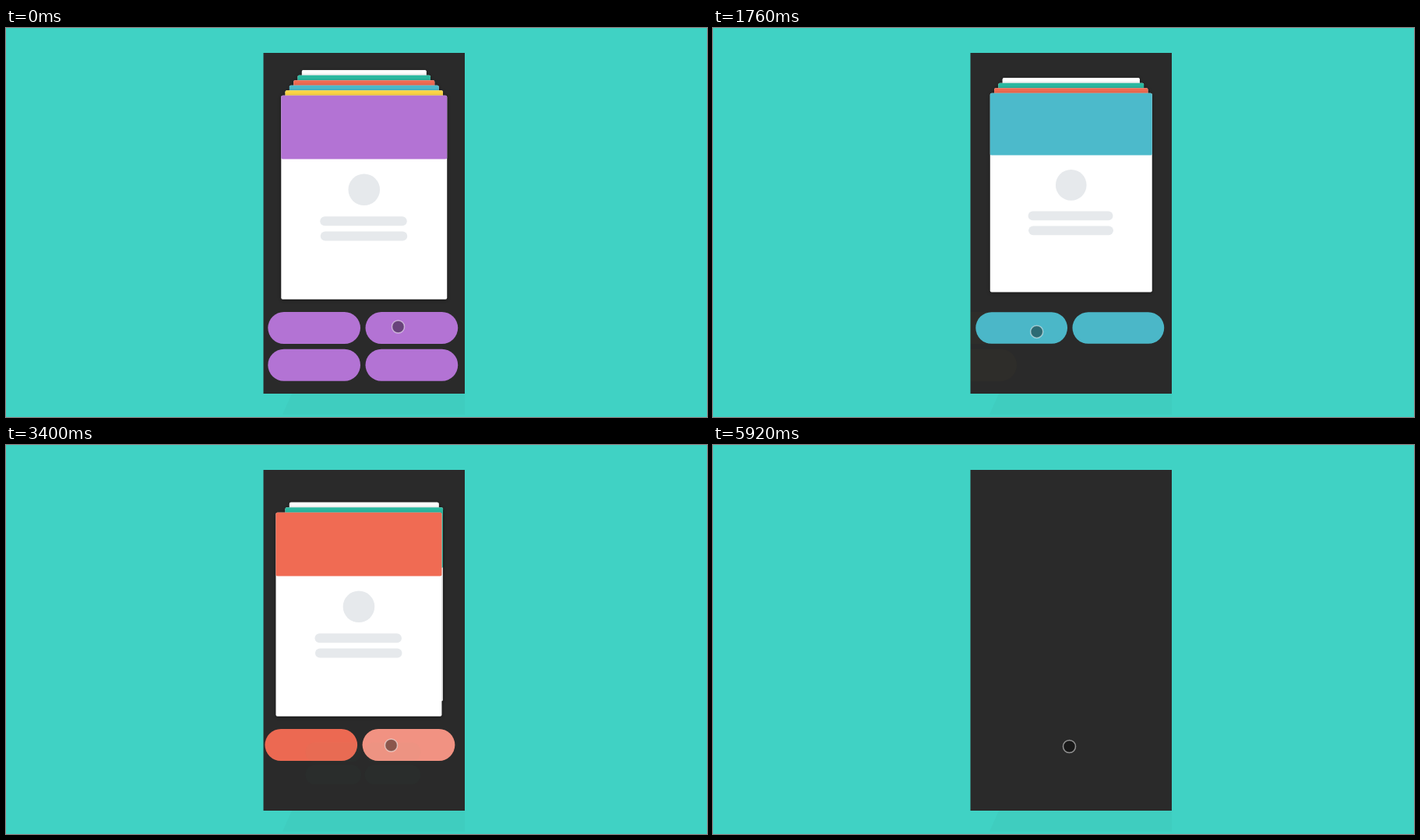
These frames come from a looping animation (900 by 500 pixels, 5960 ms). An HTML page with a canvas:

```html
<!DOCTYPE html>
<html lang="en">
<head>
<meta charset="utf-8">
<title>Card stack</title>
<style>
  html, body { margin: 0; width: 100%; height: 100%; overflow: hidden; background: #40d2c4; }
  canvas { display: block; }
</style>
</head>
<body>
<canvas id="stage" width="900" height="500"></canvas>
<script>
const ctx = document.getElementById('stage').getContext('2d');
const LOOP = 5960, STEP = 40;
const EXIT = 400, ADVANCE = 700;

// leave: when the card starts to slide away; pressed: index of the tapped button
const cards = [
  { header: '#b373d4', button: '#b373d4', count: 4, leave: 370, pressed: 1 },
  { header: '#fcd446', button: '#fcd446', count: 4, leave: 1400, pressed: 0 },
  { header: '#4cbacb', button: '#4cbacb', count: 2, leave: 2310, pressed: 0 },
  { header: '#f06b53', button: '#f06b53', count: 2, leave: 3360, pressed: 1 },
  { header: '#2cb9a1', button: '#2cb9a1', count: 4, leave: 4230, pressed: 0 },
  { header: '#fff', button: '#1c80d5', count: 1, leave: 5040, pressed: 0 },
];

// time, x, y
const pointer = [
  [0, 503.5, 384], [450, 503.5, 384], [1250, 416.5, 394], [1400, 416, 392],
  [2300, 415, 387], [2500, 415, 387], [3300, 494.5, 386], [3460, 494.5, 386],
  [4130, 406.5, 387], [4300, 407, 387], [4900, 456.5, 387.5], [LOOP, 457.5, 387.5],
];

const clamp = v => Math.max(0, Math.min(1, v));
const mix = (a, b, u) => a + (b - a) * u;
const easeQuad = u => u < 0.5 ? 2 * u * u : 1 - 2 * (1 - u) ** 2;
const progress = (t, start, length) => easeQuad(clamp((t - start) / length));

function box(x, y, w, h, r, fill) {
  ctx.fillStyle = fill;
  ctx.beginPath();
  ctx.roundRect(x, y, w, h, r);
  ctx.fill();
}

function disc(x, y, r, fill) {
  ctx.fillStyle = fill;
  ctx.beginPath();
  ctx.arc(x, y, r, 0, 7);
  ctx.fill();
}

function drawCard(card, depth, dx) {
  const scale = 1 - 0.05 * depth;
  ctx.save();
  ctx.translate(459.75 + dx, 86.8 - 6.5 * depth);
  ctx.scale(scale, scale);
  ctx.save();
  ctx.shadowColor = 'rgba(0,0,0,.4)';
  ctx.shadowBlur = 4;
  ctx.shadowOffsetY = 1;
  box(-106.5, 0, 213, 262, 2, '#fff');
  ctx.restore();
  box(-106.5, 0, 213, 81.8, 2, card.header);
  disc(0, 121, 20.3, '#e6e9ec');
  box(-56.5, 155.5, 111.5, 12, 6, '#e6e9ec');
  box(-56, 174.8, 111.5, 12, 6, '#e6e9ec');
  ctx.restore();
}

function pointerAt(t) {
  const i = pointer.findIndex(p => p[0] > t);
  const [a, b] = [pointer[i - 1], pointer[i]];
  const u = easeQuad((t - a[0]) / (b[0] - a[0]));
  return [mix(a[1], b[1], u), mix(a[2], b[2], u)];
}

function drawRipple(card, t, x, y, w, h) {
  const u = clamp((t - card.leave + 90) / 130);
  if (!u) return;
  const fade = 1 - clamp((t - card.leave - 40) / 130);
  const [px, py] = pointerAt(Math.min(t, card.leave));
  ctx.save();
  ctx.beginPath();
  ctx.roundRect(x, y, w, h, h / 2);
  ctx.clip();
  disc(px, py - 1, 9.5 + 110 * u ** 3, `rgba(255,255,255,${0.28 * fade})`);
  ctx.restore();
}

function drawButtons(card, t, enter, exit) {
  const alpha = enter * (1 - exit);
  if (alpha <= 0) return;
  const centerY = card.count > 2 ? 409.3 : 385.5;
  const scale = mix(0.6, 1, enter);
  ctx.save();
  ctx.globalAlpha = alpha;
  ctx.translate(458.5 - 194 * exit, centerY);
  ctx.scale(scale, scale);
  ctx.translate(-458.5, -centerY);
  for (let i = 0; i < card.count; i++) {
    const x = card.count === 1 ? 405.8 : 336.3 + 125.2 * (i % 2);
    const y = 365 + 47.7 * (i >> 1);
    box(x, y, 118.7, 41, 20.5, card.button);
    if (i === card.pressed) drawRipple(card, t, x, y, 118.7, 41);
  }
  ctx.restore();
}

function drawPointer(t) {
  const [x, y] = pointerAt(t);
  disc(x, y, 8, 'rgba(0,0,0,.42)');
  ctx.strokeStyle = 'rgba(255,255,255,.5)';
  ctx.lineWidth = 1.5;
  ctx.stroke();
}

function draw(t) {
  ctx.fillStyle = '#40d2c4';
  ctx.fillRect(0, 0, 900, 500);
  ctx.fillStyle = '#3fcdbf';
  ctx.beginPath();
  ctx.moveTo(367, 470);
  ctx.lineTo(589, 470);
  ctx.lineTo(589, 497);
  ctx.lineTo(355, 497);
  ctx.fill();

  ctx.save();
  ctx.beginPath();
  ctx.rect(330.5, 32, 258.5, 438);
  ctx.clip();
  ctx.fillStyle = '#2a2a2a';
  ctx.fillRect(330, 32, 260, 438);

  const exits = cards.map(c => progress(t, c.leave, EXIT));
  const advanced = cards.reduce((sum, c) => sum + progress(t, c.leave, ADVANCE), 0);
  for (let i = cards.length - 1; i >= 0; i--) {
    if (exits[i] < 1) drawCard(cards[i], Math.max(0, i - advanced), -340 * exits[i]);
  }
  cards.forEach((card, i) => drawButtons(card, t, i ? exits[i - 1] : 1, exits[i]));
  drawPointer(t);
  ctx.restore();
}

function frame() {
  draw(Math.floor(performance.now() % LOOP / STEP) * STEP);
  requestAnimationFrame(frame);
}
frame();
</script>
</body>
</html>
```
